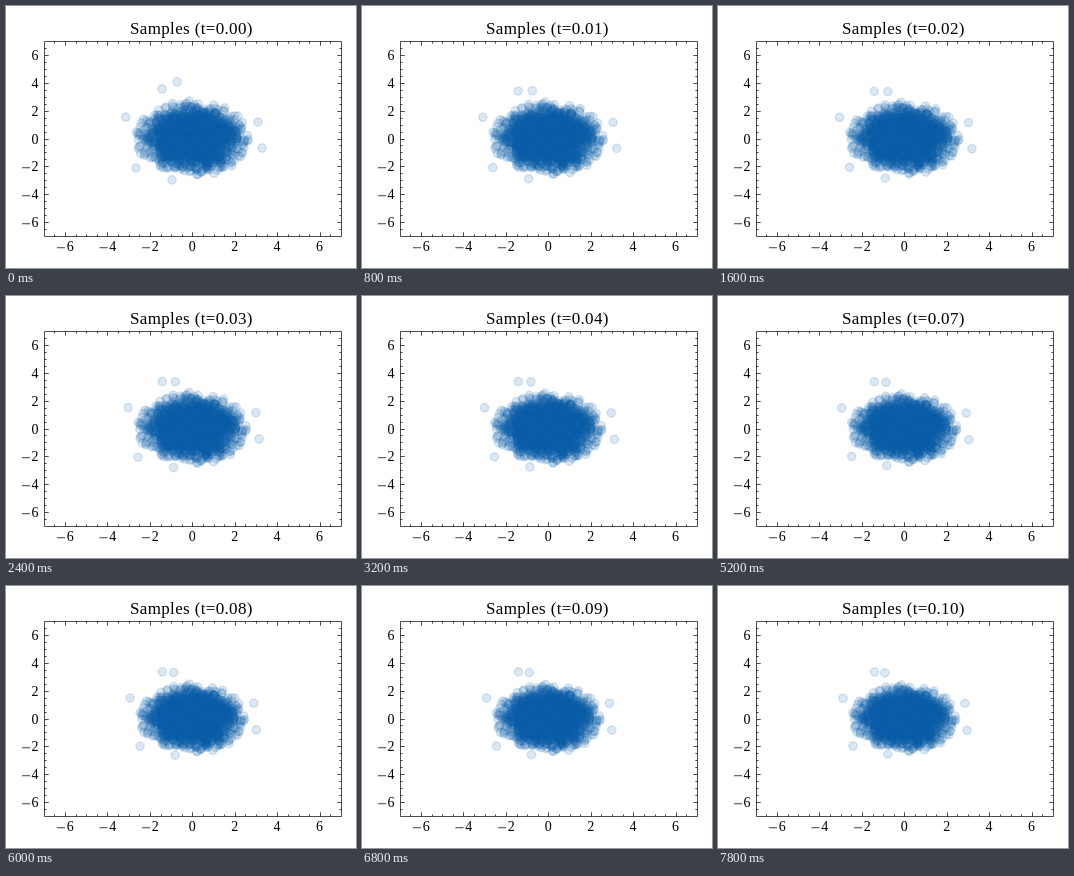
These frames come from a looping animation (350x262 px, 8 s). An HTML page with a canvas:

```html
<!DOCTYPE html>
<html lang="en">
<head>
<meta charset="utf-8">
<title>Samples</title>
<style>
  html, body { margin: 0; width: 100%; height: 100%; overflow: hidden; background: #fff; }
  canvas, svg { position: absolute; left: 0; top: 0; width: 100%; height: 100%; }
  text { font-family: "Liberation Serif", serif; font-size: 14px; fill: #000; }
  .title { font-size: 17px; letter-spacing: .35px; }
  .minus { font-family: "DejaVu Sans", sans-serif; font-size: 13px; fill-opacity: .7; }
  path { fill: none; stroke: #000; stroke-width: .7; }
</style>
</head>
<body>
<canvas id="cloud" width="350" height="262"></canvas>
<svg viewBox="0 0 350 262">
  <path id="axes"/>
  <g id="labels"></g>
  <text id="title" class="title" x="185.4" y="28" text-anchor="middle"></text>
</svg>
<script>
const LOOP = 8000, STEP = 200, LAST = LOOP / STEP - 1;
const COUNT = 2200, LIMIT = 7;
const $ = id => document.getElementById(id);
const ctx = $('cloud').getContext('2d');
const px = x => 186.4 + x * 21.23;
const py = y => 132.5 - y * 13.96;
const snap = v => Math.floor(v + .5) + .5;
const mix = (a, b, u) => a + (b - a) * u;

function buildAxes() {
  const L = snap(px(-LIMIT)), R = snap(px(LIMIT));
  const T = snap(py(LIMIT)), B = snap(py(-LIMIT));
  let d = `M${L} ${T}H${R}V${B}H${L}Z`, labels = '';
  for (let v = .5 - LIMIT; v < LIMIT; v += .5) {
    const major = v % 2 === 0, len = major ? 4.2 : 2.1;
    const x = snap(px(v)), y = snap(py(v));
    d += `M${x} ${B}v${-len}M${x} ${T}v${len}M${L} ${y}h${len}M${R} ${y}h${-len}`;
    if (!major) continue;
    const num = v < 0
      ? `<tspan class="minus" dy=".6">\u2212</tspan><tspan dy="-.6">${-v}</tspan>` : v;
    labels += `<text x="${px(v) - .2}" y="245" text-anchor="middle">${num}</text>` +
              `<text x="32.6" y="${py(v) + 5}" text-anchor="end">${num}</text>`;
  }
  $('axes').setAttribute('d', d);
  $('labels').innerHTML = labels;
}

function seeded(a) {
  return () => {
    a = a + 0x6D2B79F5 | 0;
    let t = Math.imul(a ^ a >>> 15, 1 | a);
    t = t + Math.imul(t ^ t >>> 7, 61 | t) ^ t;
    return ((t ^ t >>> 14) >>> 0) / 4294967296;
  };
}

// Normal distribution, without its far tail
function buildCloud() {
  const rnd = seeded(41), pts = [];
  while (pts.length < COUNT) {
    const r = Math.sqrt(-2 * Math.log(1 - rnd())), a = rnd() * 2 * Math.PI;
    if (r < 2.7) pts.push([r * Math.cos(a), r * Math.sin(a)]);
  }
  return pts;
}

// Isolated points: start and end
const loners = [
  [-3.13, 1.53, -2.89, 1.45], [-2.66, -2.1, -2.42, -1.97],
  [3.28, -.68, 2.95, -.85], [3.09, 1.17, 2.85, 1.08],
  [-.72, 4.05, -.92, 3.27], [-1.43, 3.55, -1.41, 3.33],
  [-.96, -2.97, -.78, -2.55]
];

function dot(x, y) {
  ctx.beginPath();
  ctx.arc(px(x), py(y), 4.17, 0, 2 * Math.PI);
  ctx.fill();
  ctx.stroke();
}

function draw(i) {
  const u = (i / LAST) ** .75, late = Math.exp(-i / 1.6);
  // Anything above 3.4 drops to it quickly
  const settle = y => y > 3.4 ? mix(3.4, y, late) : y;
  ctx.clearRect(0, 0, 350, 262);
  ctx.fillStyle = ctx.strokeStyle = 'rgba(12,93,165,.15)';
  ctx.lineWidth = 1.39;
  for (const [x, y] of points) dot(x * (1 - .08 * u), y * (1 - .1 * u));
  for (const [x, y, endX, endY] of loners) dot(mix(x, endX, u), mix(settle(y), endY, u));
  $('title').textContent = `Samples (t=${(i / LAST / 10).toFixed(2)})`;
}

const points = buildCloud();
let shown = -1;
function frame() {
  const i = Math.floor(performance.now() % LOOP / STEP);
  if (i !== shown) draw(shown = i);
  requestAnimationFrame(frame);
}
buildAxes();
frame();
</script>
</body>
</html>
```
